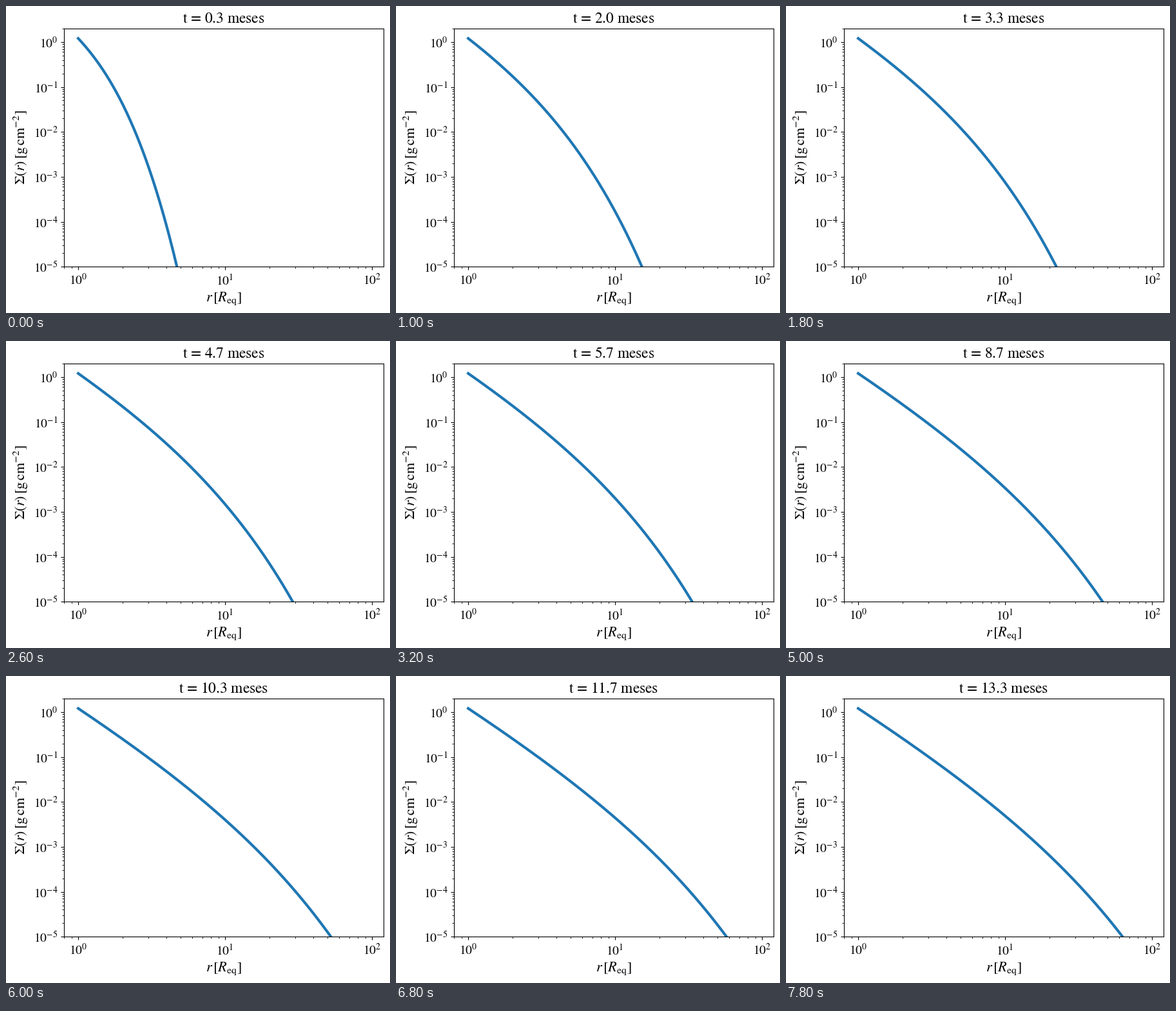
These frames come from a looping animation (596x476 px, 8000 ms). A matplotlib script:

```python
import numpy as np
import matplotlib.pyplot as plt
from matplotlib.animation import FuncAnimation
from matplotlib.ticker import FuncFormatter

W, H, DPI = 596, 476, 100
FRAMES, STEP_MS = 40, 200
SIGMA0 = 1.2      # surface density at the inner edge
RATE = 0.0933     # diffusion rate per month, in x = sqrt(r)

plt.rcParams.update({
    "font.size": 14,
    "axes.labelsize": 16,
    "mathtext.fontset": "stix",
})

# Viscous spreading: S = r^2 * sigma obeys dS/dt = RATE * x * S_xx,
# with S fixed at x = 1 and zero at the far edge.
N, X_MAX = 1100, 12.0
x = np.linspace(1, X_MAX, N + 2)
inner = x[1:-1]
root = np.sqrt(RATE * inner) / (x[1] - x[0])
lap = np.diag(np.full(N, -2.0)) + np.eye(N, k=1) + np.eye(N, k=-1)
rates, modes = np.linalg.eigh(root[:, None] * lap * root)
steady = (X_MAX - inner) / (X_MAX - 1)
weights = modes.T @ (steady / root)
r = x[:-1] ** 2


def sigma(t):
    s = steady - root * (modes @ (np.exp(rates * t) * weights))
    s = np.concatenate(([1.0], np.maximum(s, 1e-11)))
    return SIGMA0 * s / r ** 2


def power_label(value, _):
    return f"$10^{{{round(np.log10(value))}}}$"


fig = plt.figure(figsize=(W / DPI, H / DPI), dpi=DPI, facecolor="white")
ax = fig.add_axes([90 / W, 71.6 / H, 496 / W, 369.6 / H])
ax.set_xscale("log")
ax.set_yscale("log")
ax.set_xlim(0.8, 120)
ax.set_ylim(1e-5, 2)
for axis in (ax.xaxis, ax.yaxis):
    axis.set_major_formatter(FuncFormatter(power_label))
ax.set_xlabel(r"$r\,[R_{\mathrm{eq}}]$")
ax.set_ylabel(r"$\Sigma(r)\,[\mathrm{g\,cm^{-2}}]$")
title = ax.set_title("")
curve, = ax.plot([], [], color="#1f77b4", lw=3)


def draw(i):
    months = (i + 1) / 3
    curve.set_data(r, sigma(months))
    title.set_text(rf"$\text{{t = {months:.1f} meses}}$")
    return curve, title


anim = FuncAnimation(fig, draw, frames=FRAMES, interval=STEP_MS,
                     init_func=lambda: draw(0), repeat=True, repeat_delay=0)
plt.show()
```
